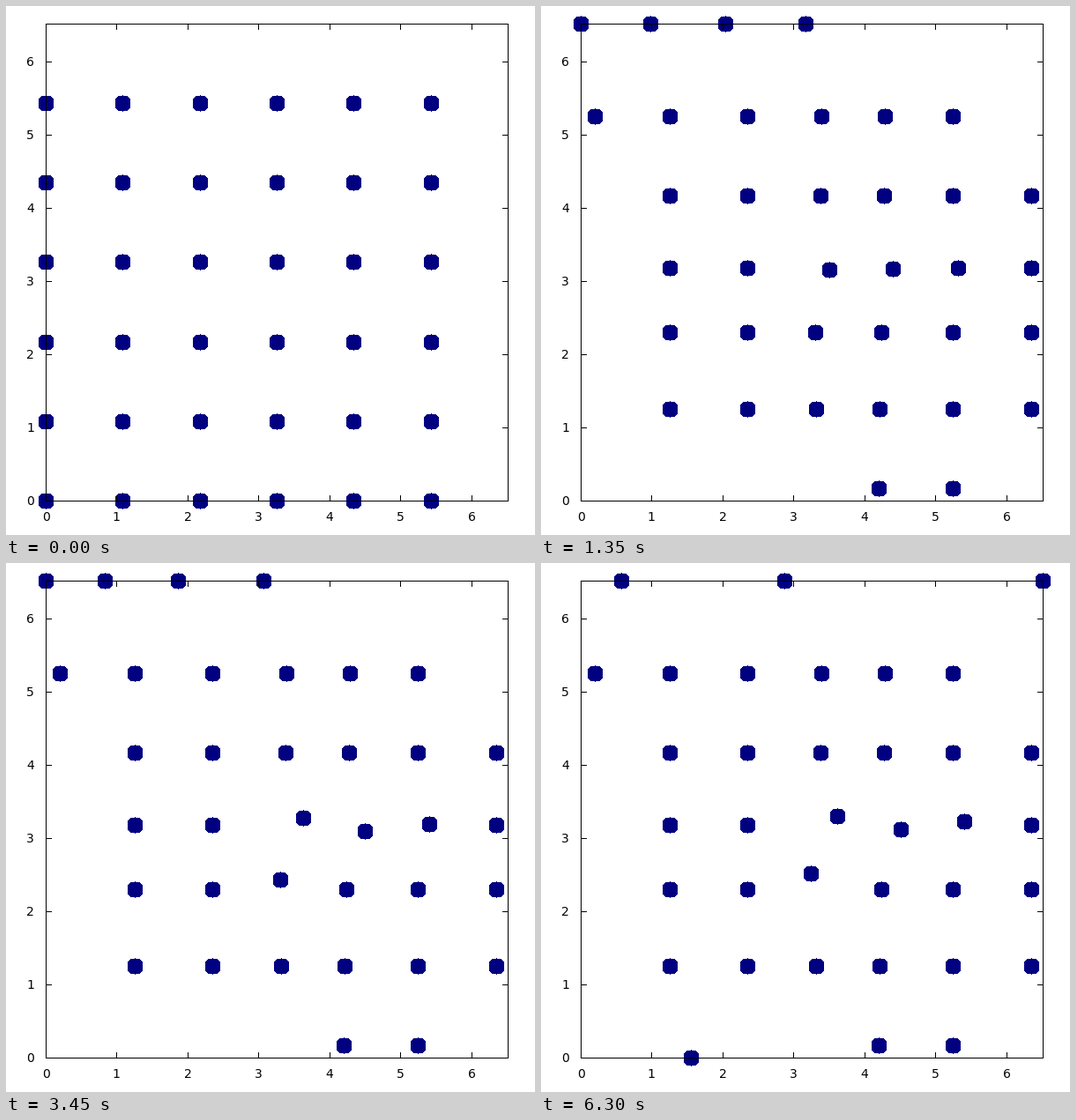
These frames come from a looping animation (600x600 px, 6.35 s). A matplotlib script:

```python
import numpy as np
import matplotlib.pyplot as plt
from matplotlib.animation import FuncAnimation
from matplotlib.patches import PathPatch
from matplotlib.path import Path

FRAMES, INTERVAL = 127, 50
PT = 0.72  # points per pixel at 100 dpi
LEFT, RIGHT, TOP, BOTTOM = 45, 569, 20, 561
N = 6      # particles per side of the lattice

row, slot = np.mgrid[:N, :N]
# In rows 1 to 4 the left-wall particle crosses to the right wall.
col = np.where((row >= 1) & (row <= 4) & (slot == 0), N, slot)
on_top = (row == 0) & (col < 4)

start_x = LEFT + col * (RIGHT - LEFT) / N
start_y = np.where(on_top, TOP, BOTTOM - row * (BOTTOM - TOP) / N)

# Rest positions: columns by rows, the middle columns lean a little
rest_cols = np.array([61, 146, 234, 311, 383, 467, 556])
rest_rows = np.array([547, 457, 370, 297, 215, 125])
lean = 1.4 * row * ((col == 3) | (col == 4))
rest_x = np.where(on_top, start_x, rest_cols[col] + lean)
rest_y = np.where(on_top, TOP, rest_rows[row])

SETTLE = 27
SLIDE = np.array([0, 41, 50, 31])  # leftward travel along the top wall

# Wandering particles near the centre: (row, col) -> offsets from rest
WANDER_T = [9, 27, 51, 92, 126]
WANDER = {
    (3, 3): ([0, 12, 21, 22, 21], [0, 2, -2, -16, -10]),
    (2, 3): ([0, -3, -4, -2, -8], [0, 0, -6, -18, -18]),
    (3, 4): ([0, 12, 21, 19, 21], [0, 1, 8, 6, 5]),
    (3, 5): ([0, 6, 13, 12, 13], [0, 0, 0, -3, -4]),
}


def positions(t):
    ease = 1 - (1 - min(t / SETTLE, 1)) ** 1.5
    x = start_x + (rest_x - start_x) * ease
    y = start_y + (rest_y - start_y) * ease
    x[0, :4] -= SLIDE * np.interp(t, [0, 51, 92, 126], [0, 0.4, 0.62, 1])
    for spot, (dx, dy) in WANDER.items():
        x[spot] += np.interp(t, WANDER_T, dx)
        y[spot] += np.interp(t, WANDER_T, dy)

    # wall particles jump to the opposite side
    if t == 0:
        x[x > RIGHT - 1] = LEFT
        y[y < TOP + 1] = BOTTOM
    if 85 <= t < 111:
        y[0, 0] = BOTTOM
    if t >= 111:
        x[0, 0] = RIGHT
    if t >= 98:
        y[0, 2] = BOTTOM
    return np.column_stack([x.ravel(), y.ravel()]).round()


fig = plt.figure(figsize=(6, 6), dpi=100, facecolor="white")
ax = fig.add_axes([0, 0, 1, 1])
# The quarter-pixel shift keeps snapped lines off rounding ties.
ax.set_xlim(-0.25, 599.75)
ax.set_ylim(599.75, -0.25)
ax.axis("off")


def rule(xs, ys):
    ax.plot(xs, ys, color="black", lw=PT, antialiased=False, zorder=3,
            solid_capstyle="projecting", solid_joinstyle="miter")


def label(x, y, n, ha):
    ax.text(x, y, str(n), ha=ha, va="baseline", family="DejaVu Sans",
            size=14 * PT, color="black")


rule([LEFT, RIGHT, RIGHT, LEFT, LEFT], [TOP, TOP, BOTTOM, BOTTOM, TOP])
for n in range(7):
    tx, ty = round(LEFT + 80.45 * n), round(BOTTOM - 83.05 * n)
    for wall, step in ((LEFT, 6), (RIGHT, -6)):
        rule([wall, wall + step], [ty, ty])
    for wall, step in ((TOP, 6), (BOTTOM, -6)):
        rule([tx, tx], [wall, wall + step])
    label(tx, 584, n, "center")
    label(32, ty + 5, n, "right")

# Octagonal dot with a one-pixel tip above and below
quarter = [(0.5, 9.5), (0.5, 8.5), (4.5, 8.5), (8.5, 4.5)]
half = quarter + [(a, -b) for a, b in quarter[::-1]]
outline = half + [(-a, b) for a, b in half[::-1]]
dot = np.array(outline + outline[:1])
codes = [Path.MOVETO] + [Path.LINETO] * (len(dot) - 2) + [Path.CLOSEPOLY]


def dots_path(t):
    centres = positions(t) + 0.25  # pixel centres in shifted axes
    verts = (centres[:, None] + dot).reshape(-1, 2)
    return Path(verts, codes * len(centres))


dots = PathPatch(dots_path(0), facecolor="#000080", lw=0, antialiased=False,
                 snap=False, clip_on=False, zorder=2)
ax.add_patch(dots)


def update(t):
    dots.set_path(dots_path(t))
    return dots,


anim = FuncAnimation(fig, update, frames=FRAMES, interval=INTERVAL,
                     init_func=lambda: update(0), repeat=True, repeat_delay=0)
plt.show()
```
